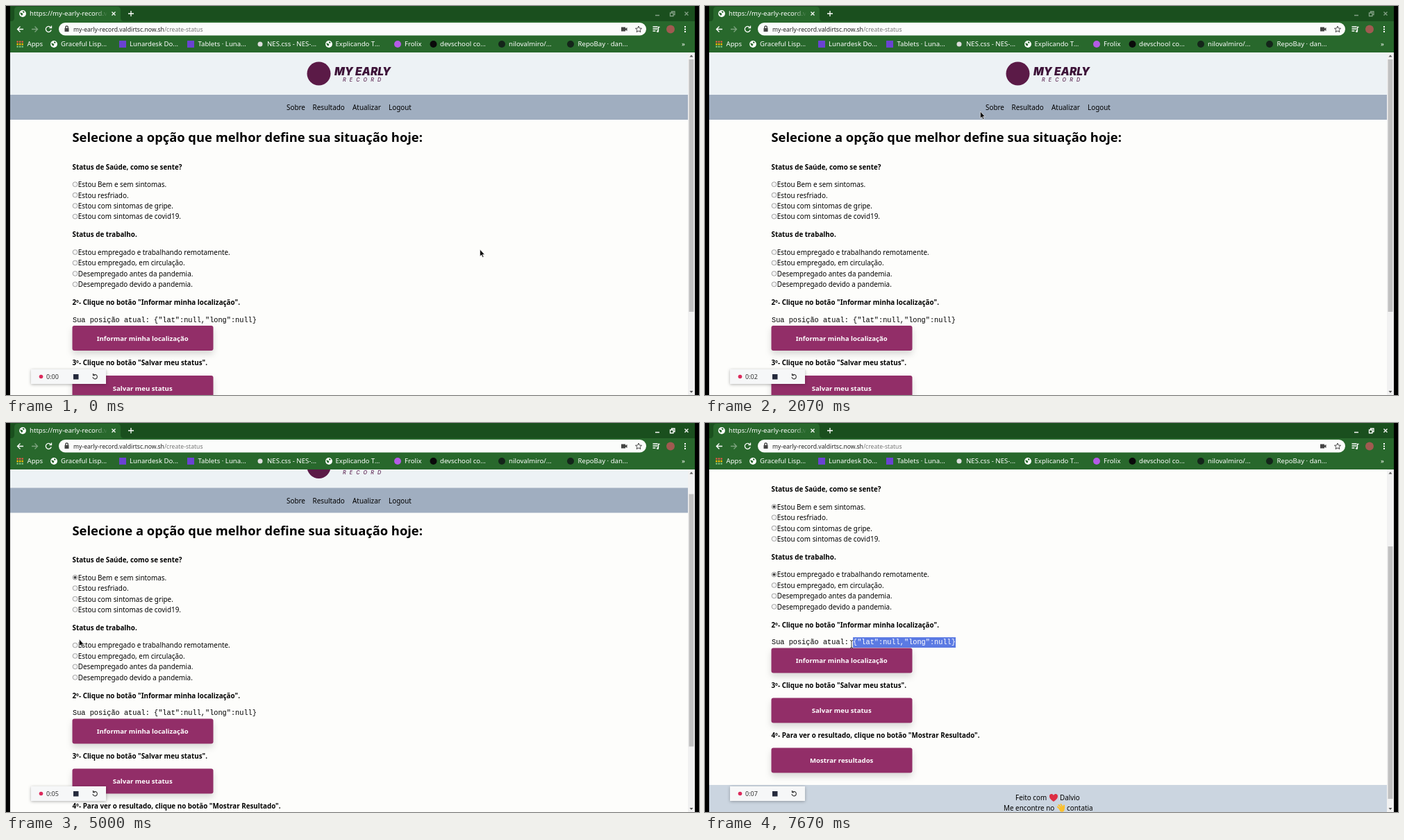
Recreate the animation shown at these times as an HTML page. Size 998 by 561 pixels, loop 8000 ms.

```html
<!DOCTYPE html>
<html lang="pt">
<head>
<meta charset="utf-8">
<title>Status</title>
<style>
  html, body { margin: 0; width: 100%; height: 100%; overflow: hidden; background: #000; }
  svg { display: block; width: 100%; height: 100%; }
  text { font: 9.88px "Noto Sans", "Open Sans", sans-serif; white-space: pre; }
  .ui { font-size: 9.6px; fill: #fff; }
  .url { font-size: 8.6px; fill: #222; }
  .bold { font-size: 9.82px; font-weight: 700; }
  .title { font-size: 18.35px; font-weight: 700; }
  .mono { font: 10.27px "Liberation Mono", monospace; }
  .label { font-size: 9.6px; font-weight: 700; fill: #fff; text-anchor: middle; }
  .button { fill: #922e68; filter: drop-shadow(0 5px 5px rgba(0, 0, 0, .15)); }
  .brand { font: italic 900 15.5px Inter, sans-serif; fill: #3d1238; }
  .brand-sub { font: italic 500 7.2px Inter, sans-serif; letter-spacing: 5.1px; fill: #5b2450; }
  .hover { fill: #fff; text-decoration: underline; }
  .line { fill: none; stroke: #fff; stroke-width: 1.3; }
  .dark { stroke: #333; }
</style>
</head>
<body>
<svg viewBox="0 0 998 561" preserveAspectRatio="none">
  <defs>
    <linearGradient id="fade">
      <stop offset="0" stop-color="#28682c" stop-opacity="0"/>
      <stop offset="1" stop-color="#28682c"/>
    </linearGradient>
    <clipPath id="view"><rect x="6" y="67" width="986" height="494"/></clipPath>
    <clipPath id="picked"><rect class="selection" y="445.5" height="15"/></clipPath>
    <g id="globe">
      <circle r="4.9" fill="#fff"/>
      <path d="M-4-1.5L-1-1 .5 .5-1 3-2.5 1.5zM0-4L3-2.5 1.5-1 0-2z" fill="#28682c"/>
    </g>
  </defs>

  <g clip-path="url(#view)">
    <rect x="6" y="67" width="986" height="494" fill="#fdfdfb"/>
    <g id="page">
      <rect x="6" y="67" width="976" height="61" fill="#edf2f5"/>
      <circle cx="450.5" cy="97.5" r="17" fill="#5b1a47"/>
      <text class="brand" x="473" y="99.5">MY EARLY</text>
      <text class="brand-sub" x="485" y="108.5">RECORD</text>
      <rect x="6" y="128" width="976" height="36" fill="#a0aec0"/>
      <g id="nav"></g>
      <text class="title" x="95.5" y="196">Selecione a opção que melhor define sua situação hoje:</text>
      <g id="form"></g>
      <text class="mono" x="96" y="455.5">Sua posição atual: {"lat":null,"long":null}</text>
      <rect class="selection" y="445.5" height="15" fill="#5b7ae3"/>
      <text class="mono" x="96" y="455.5" fill="#fff" clip-path="url(#picked)">Sua posição atual: {"lat":null,"long":null}</text>
      <rect x="6" y="658.5" width="976" height="60" fill="#cbd5e0"/>
      <text x="447" y="680">Feito com</text>
      <path d="M502 682.5C497 679 496 677 496 674.5C496 671 500.5 670.5 502 673.5C503.5 670.5 508 671 508 674.5C508 677 507 679 502 682.5Z" fill="#dd2e44"/>
      <text x="511" y="680">Dalvio</text>
      <text x="430" y="695.5">Me encontre no</text>
      <path d="M508 690l3 3M509.5 687.5l4 4M512.5 686.5l3 4M517 688v4" stroke="#fbc02d" stroke-width="2" stroke-linecap="round"/>
      <circle cx="514" cy="693.5" r="3.7" fill="#fbc02d"/>
      <text x="521" y="695.5">contatia</text>
    </g>
    <rect x="982" y="67" width="10" height="494" fill="#f1f1f1"/>
    <rect id="thumb" x="983.5" width="7" height="364" fill="#c1c1c1"/>
    <path d="M984.5 73.5h5l-2.5-3zM984.5 555h5l-2.5 3z" fill="#555"/>
  </g>

  <g id="browser">
    <rect x="6" width="986" height="22" fill="#1a4f1e"/>
    <rect x="6" y="22" width="986" height="45" fill="#28682c"/>
    <path d="M7 22q5 0 5-5V6q0-5 5-5h143q5 0 5 5v11q0 5 5 5z" fill="#28682c"/>
    <use href="#globe" x="24" y="11"/>
    <text class="ui" x="34" y="14.3">https://my-early-record.va</text>
    <rect x="128" y="2" width="18" height="19" fill="url(#fade)"/>
    <rect x="146" y="2" width="6" height="19" fill="#28682c"/>
    <path class="line" d="M152.5 8.5l5 5m0-5l-5 5M180 7v8m-4-4h8"/>
    <path id="controls" class="line" d="M935 13.5h6M956.5 10h4.5v4.5h-4.5zM958.5 10V8h4.5v4.5h-2M977.5 8.5l5 5m0-5l-5 5"/>

    <path class="line" d="M25 33.5h-8.5m4-4l-4 4 4 4M64.5 31a4 4 0 1 0 .7 3.5M65.5 28.5v3h-3"/>
    <path class="line" d="M37 33.5h8.5m-4-4l4 4-4 4" opacity=".4"/>
    <rect x="76" y="24" width="846" height="18.5" rx="9.25" fill="#fbfcfb"/>
    <rect x="84.5" y="32" width="6" height="5" fill="#444"/>
    <path class="line dark" d="M85.8 32v-1.5a1.7 1.7 0 0 1 3.4 0V32" stroke-width="1"/>
    <text class="url" x="97" y="36.5">my-early-record.valdirtsc.now.sh<tspan fill="#777">/create-status</tspan></text>
    <path d="M886 30.5h6v2l2.5-1.5v5l-2.5-1.5v2h-6z" fill="#444"/>
    <path class="line dark" d="M911 29l1.3 3 3.2.3-2.4 2.1.7 3.2-2.8-1.7-2.8 1.7.7-3.2-2.4-2.1 3.2-.3z" style="stroke-width:.9"/>
    <path class="line" d="M931.5 30h7M931.5 33h7M931.5 36h4M939.5 36.5v-6h2"/>
    <circle cx="938.5" cy="36.5" r="1.5" fill="#fff"/>
    <circle cx="957" cy="33.5" r="6" fill="#a05a50"/>
    <path d="M977 29h2v2h-2zM977 32.5h2v2h-2zM977 36h2v2h-2z" fill="#fff"/>
    <g id="bookmarks"></g>
    <text class="ui" x="973" y="58">»</text>
  </g>

  <g id="recorder">
    <rect x="36" y="524" width="108" height="21" fill="#f6f7f8" style="filter: drop-shadow(0 1px 2px rgba(0,0,0,.3))"/>
    <circle cx="50.5" cy="534.5" r="2.8" fill="#dc2a5c"/>
    <text id="clock" x="58" y="538" style="font-size:9px" fill="#333"></text>
    <rect x="97" y="531" width="7.5" height="7.5" fill="#252a3c"/>
    <path class="line dark" d="M126 532.3a3.2 3.2 0 1 1-1 2.8M125.5 530v2.7h2.7" style="stroke-width:1.1"/>
  </g>

  <g id="pointer">
    <path id="arrow" d="M0 0v10l2.3-2 1.6 3.5 1.6-.7-1.6-3.4h3z" fill="#111" stroke="#fff" stroke-width=".6"/>
    <path id="hand" d="M-1 0q1-1 2 0v4l5 1q1 .5 .7 2l-1 4h-6l-3.5-4.5q0-1.5 1.5-.7l1.3 1z" fill="#fff" stroke="#222" stroke-width=".8"/>
    <path id="beam" d="M-2-3.5q2 0 2 1.5v8q0 1.5-2 1.5M2-3.5q-2 0-2 1.5M2 7.5q-2 0-2-1.5" fill="none" stroke="#333"/>
  </g>
</svg>
<script>
const $ = id => document.getElementById(id);
const text = (cls, x, y, s) => `<text class="${cls}" x="${x}" y="${y}">${s}</text>`;
const LOOP = 8000, STEP = 1000 / 15;

const navItems = [["Sobre", 404, 431], ["Resultado", 441.5, 489], ["Atualizar", 499, 541], ["Logout", 551, 584]];
$("nav").innerHTML = navItems.map(([name, x]) => text("", x, 150, name)).join("");

const options = (top, labels) => labels.map((label, i) => {
  const y = top + i * 15.45;
  return `<circle cx="99.5" cy="${y}" r="3.4" fill="#f4f4f4" stroke="#999" stroke-width=".9"/>` +
    `<circle class="dot" cx="99.5" cy="${y}" r="2" fill="#444" visibility="hidden"/>` +
    text("", 103.7, y + 3.9, label);
}).join("");
const button = (y, label) =>
  `<rect class="button" x="95.5" y="${y}" width="203" height="36" rx="3"/>` + text("label", 196.7, y + 21.5, label);

$("form").innerHTML =
  text("bold", 95.5, 235.5, "Status de Saúde, como se sente?") +
  options(257.2, ["Estou Bem e sem sintomas.", "Estou resfriado.",
    "Estou com sintomas de gripe.", "Estou com sintomas de covid19."]) +
  text("bold", 95.5, 333.2, "Status de trabalho.") +
  options(355, ["Estou empregado e trabalhando remotamente.", "Estou empregado, em circulação.",
    "Desempregado antes da pandemia.", "Desempregado devido a pandemia."]) +
  text("bold", 95.5, 431, '2º- Clique no botão "Informar minha localização".') +
  button(461, "Informar minha localização") +
  text("bold", 95.5, 518.3, '3º- Clique no botão "Salvar meu status".') +
  button(533, "Salvar meu status") +
  text("bold", 95.5, 590, '4º- Para ver o resultado, clique no botão "Mostrar Resultado".') +
  button(605, "Mostrar resultados");

const disc = (x, r, fill) => `<circle cx="${x}" cy="55" r="${r}" fill="${fill}"/>`;
const square = x => `<rect x="${x - 5}" y="50" width="10" height="10" fill="#6a43d2"/>`;
const globe = x => `<use href="#globe" x="${x}" y="55"/>`;
const appGrid = [0, 1, 2].flatMap(r => [0, 1, 2].map(c =>
  `<rect x="${15.5 + c * 3.5}" y="${50.5 + r * 3.5}" width="2.3" height="2.3" fill="${["#ea5a45", "#fbbc04", "#7cc47f"][r]}"/>`)).join("");
$("bookmarks").innerHTML = [
  [appGrid, 30.5, "Apps"],
  [globe(69), 79, "Graceful Lisp..."],
  [square(168), 178, "Lunardesk Do..."],
  [square(266), 276.5, "Tablets · Luna..."],
  [disc(366, 3.5, "#ddd"), 376, "NES.css - NES-..."],
  [globe(465), 474.5, "Explicando T..."],
  [disc(564, 5, "#b45be6"), 574, "Frolix"],
  [disc(615.5, 5, "#0a0a0a"), 625, "devschool co..."],
  [disc(714, 5, "#14251a"), 724, "nilovalmiro/..."],
  [disc(813, 5, "#14251a"), 823.5, "RepoBay · dan..."],
].map(([icon, x, name]) => icon + text("ui", x, 58, name)).join("");

// time, x, y of the pointer tip
const path = [
  [130, 682.5, 351], [870, 560, 146], [1200, 507, 141], [1600, 462, 143], [1930, 418, 144],
  [2730, 140, 248], [3130, 109, 258], [3330, 101, 254], [4130, 101, 254], [4400, 110, 266],
  [5130, 105, 316], [5530, 100, 317], [5870, 100, 317], [6200, 347, 377], [6470, 357.5, 388],
  [6670, 362, 340], [6930, 361, 317], [7070, 361, 317], [7670, 211, 317],
];
const ticks = [867, 1667, 2400, 3067, 4133, 5267, 7133];
const FIRST_CLICK = 3460, SECOND_CLICK = 5660;

const progress = (t, a, b) => Math.min(1, Math.max(0, (t - a) / (b - a)));
const smooth = p => p * p * (3 - 2 * p);
const easeOut = p => 1 - (1 - p) ** 3;

function pointerAt(t) {
  const i = path.findIndex(k => k[0] > t);
  if (i === 0) return path[0].slice(1);
  if (i < 0) return path.at(-1).slice(1);
  const [t0, x0, y0] = path[i - 1], [t1, x1, y1] = path[i];
  const p = smooth(progress(t, t0, t1));
  return [x0 + (x1 - x0) * p, y0 + (y1 - y0) * p];
}

const show = (el, on) => el.setAttribute("visibility", on ? "visible" : "hidden");
const links = [...$("nav").children];
const dots = document.querySelectorAll(".dot");
const selections = document.querySelectorAll(".selection");

function draw(now) {
  const t = Math.floor((now % LOOP + 4) / STEP) * STEP;
  const scroll = 34.5 * smooth(progress(t, 4333, 4800)) + 102 * easeOut(progress(t, 6267, 6667));
  $("page").setAttribute("transform", `translate(0 ${-scroll})`);
  $("thumb").setAttribute("y", 77 + scroll * .74);

  const [x, y] = pointerAt(t);
  $("pointer").setAttribute("transform", `translate(${x} ${y})`);
  const hovered = navItems.findIndex(([, a, b]) => x >= a && x <= b && y > 138 - scroll && y < 155 - scroll);
  links.forEach((link, i) => link.setAttribute("class", i === hovered ? "hover" : ""));
  const overText = t > 6860;
  show($("hand"), hovered >= 0);
  show($("beam"), overText);
  show($("arrow"), hovered < 0 && !overText);

  show(dots[0], t >= FIRST_CLICK);
  show(dots[4], t >= SECOND_CLICK);
  $("controls").style.opacity = t >= FIRST_CLICK ? 1 : .45;

  // selection snaps to whole characters, dragged leftwards from the end
  const advance = 6.163, end = 96 + 43 * advance;
  const count = t > 7070 ? Math.min(24, Math.max(0, Math.round((end - x) / advance))) : 0;
  for (const s of selections) {
    s.setAttribute("x", end - count * advance);
    s.setAttribute("width", count * advance);
  }

  $("clock").textContent = "0:0" + ticks.filter(k => t >= k - 1).length;
}

const start = performance.now();
function frame() {
  draw(performance.now() - start);
  requestAnimationFrame(frame);
}
frame();
</script>
</body>
</html>
```
